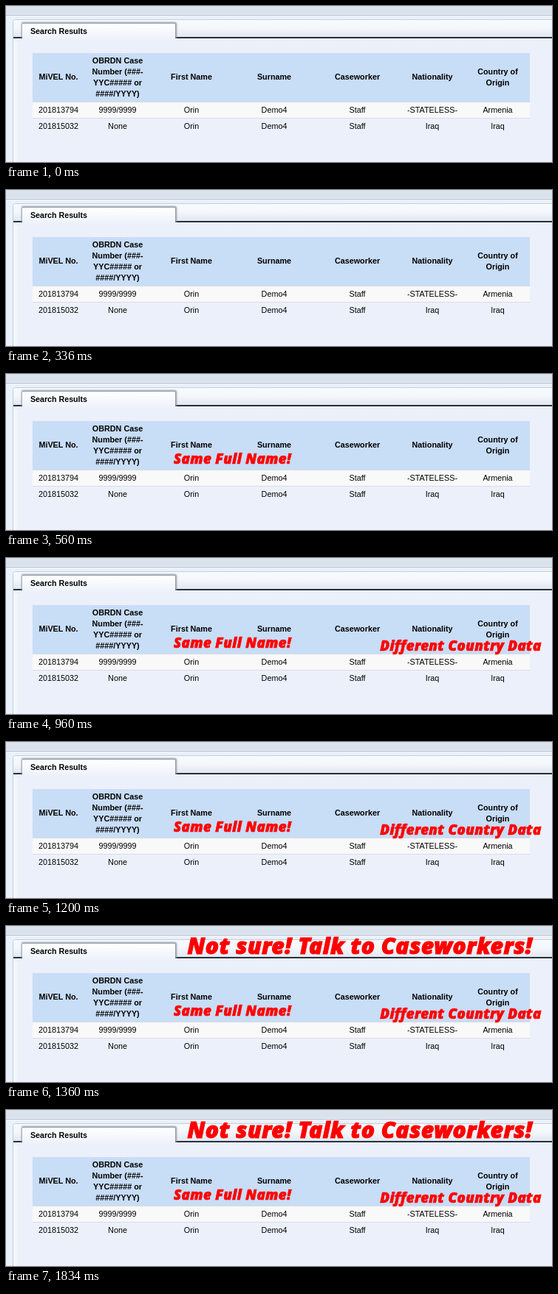
An HTML page that plays this animation: 739x212 px, repeating every 2.15 s.

```html
<!DOCTYPE html>
<html lang="en">
<head>
<meta charset="utf-8">
<title>Search Results</title>
<style>
  html, body { margin: 0; width: 100%; height: 100%; overflow: hidden; background: #ebf0fa; }
  svg { display: block; width: 739px; height: 212px; }
  text { font-family: "Liberation Sans", Arial, sans-serif; font-size: 10.8px; fill: #000; }
  .head { font-weight: 700; }
  .cell { text-anchor: middle; }
  .note {
    font-family: "Open Sans", "Noto Sans", sans-serif;
    font-weight: 800;
    font-style: italic;
    letter-spacing: .016em;
    text-anchor: middle;
    fill: #f00;
    stroke: #f00;
    stroke-width: .035em;
  }
</style>
</head>
<body>
<svg viewBox="0 0 739 212">
  <defs>
    <linearGradient id="bar" x2="0" y2="1">
      <stop offset="0" stop-color="#f9fbfe"/>
      <stop offset=".5" stop-color="#f3f6fb"/>
      <stop offset="1" stop-color="#e1e8f1"/>
    </linearGradient>
    <linearGradient id="tab" x2="0" y2="1">
      <stop offset="0" stop-color="#fff"/>
      <stop offset="1" stop-color="#ecf0fa"/>
    </linearGradient>
    <linearGradient id="side">
      <stop offset="0" stop-color="#fbfcfe"/>
      <stop offset="1" stop-color="#e9eef7"/>
    </linearGradient>
    <filter id="soft" x="-5%" y="-20%" width="110%" height="140%">
      <feGaussianBlur stdDeviation=".8"/>
    </filter>
  </defs>
  <rect width="739" height="212" fill="#ebf1fb"/>
  <rect width="739" height="11" fill="#dae2ec"/>
  <rect y="12" width="739" height="1" fill="#b4bfcc"/>
  <rect x="9" y="44" width="9" height="168" fill="url(#side)"/>
  <path d="M9 42V21Q9 18 12 18H739V42Z" fill="url(#bar)"/>
  <path d="M9.500 212V21.500Q9.500 18.500 12.500 18.500H739" fill="none" stroke="#c3ccd8"/>
  <rect x="18" y="44" width="721" height="168" fill="#ecf0fa"/>
  <rect x="10" y="42" width="729" height="2" fill="#26323f"/>
  <path d="M21 44V24Q21 22 23 22H229Q231 22 231 24V44Z" fill="#8e98a4" filter="url(#soft)"/>
  <path d="M22 47V25Q22 24 23 24H228Q229 24 229 25V44H739V47Z" fill="url(#tab)"/>
  <text x="33" y="38" class="head" style="font-size:10.67px">Search Results</text>
  <rect x="36" y="64" width="673" height="67" fill="#c8ddf6"/>
  <rect x="36" y="131" width="673" height="21" fill="#f9f9f9"/>
  <path d="M36 130.500H709M36 152.500H709" stroke="#d9dde2"/>
  <g id="table"></g>
  <g id="notes"></g>
</svg>
<script>
  const LOOP = 2150;
  const columns = [
    { x: 71, head: ["MiVEL No."], cells: ["201813794", "201815032"] },
    { x: 151, head: ["OBRDN Case", "Number (###-", "YYC##### or", "####/YYYY)"], cells: ["9999/9999", "None"] },
    { x: 251, head: ["First Name"], cells: ["Orin", "Orin"] },
    { x: 363, head: ["Surname"], cells: ["Demo4", "Demo4"] },
    { x: 475.5, head: ["Caseworker"], cells: ["Staff", "Staff"] },
    { x: 577, head: ["Nationality"], cells: ["-STATELESS-", "Iraq"] },
    { x: 665.5, head: ["Country of", "Origin"], cells: ["Armenia", "Iraq"] }
  ];
  const notes = [
    { at: 560, x: 306.5, y: 122, size: 18.8, label: "Same Full Name!" },
    { at: 960, x: 615.5, y: 126, size: 18.8, label: "Different Country Data" },
    { at: 1360, x: 479, y: 38, size: 30.2, label: "Not sure! Talk to Caseworkers!" }
  ];

  function addText(parent, x, y, label, className) {
    const el = document.createElementNS("http://www.w3.org/2000/svg", "text");
    el.setAttribute("x", x);
    el.setAttribute("y", y);
    el.setAttribute("class", className);
    el.textContent = label;
    return parent.appendChild(el);
  }

  const table = document.getElementById("table");
  for (const { x, head, cells } of columns) {
    const top = Math.round(100 - (head.length - 1) * 7.5);
    head.forEach((line, i) => addText(table, x, top + i * 15, line, "head cell"));
    cells.forEach((value, i) => addText(table, x, 145 + i * 22, value, "cell"));
  }

  const layer = document.getElementById("notes");
  for (const note of notes) {
    note.el = addText(layer, note.x, note.y, note.label, "note");
    note.el.style.fontSize = note.size + "px";
  }

  function draw(time) {
    for (const { el, at } of notes) el.style.visibility = time >= at ? "visible" : "hidden";
  }

  const start = performance.now();
  function tick() {
    draw((performance.now() - start) % LOOP);
    requestAnimationFrame(tick);
  }
  tick();
</script>
</body>
</html>
```
